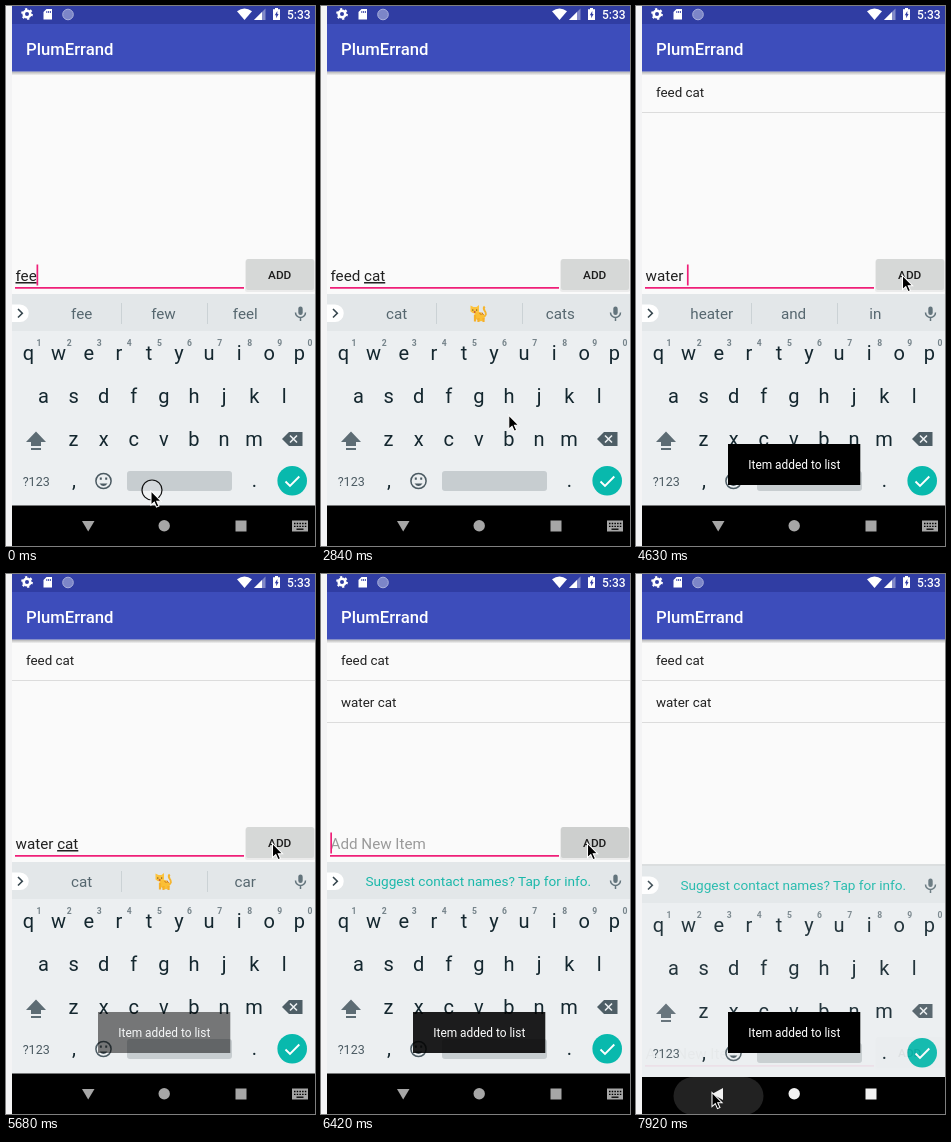
Recreate the animation shown at these times as an HTML page. Size 309x540 px, loop 8 s.

```html
<!DOCTYPE html>
<html lang="en">
<head>
<meta charset="utf-8">
<title>To-do list</title>
<style>
  html, body { margin: 0; width: 100%; height: 100%; overflow: hidden; background: #f4f4f5; }
  svg { display: block; width: 100%; height: 100%; }
  text { font-family: Roboto, sans-serif; white-space: pre; }
  .mid { text-anchor: middle; }
  .item { font-size: 13.4px; fill: #212121; }
  .edit { font-size: 15.2px; fill: #212121; }
  .bold { font-weight: 500; }
  .word { font-size: 15.2px; fill: #56676f; }
  .key { font-size: 20px; fill: #14272f; }
  .digit { font-size: 8.6px; font-weight: 700; fill: #75838a; }
</style>
</head>
<body>
<svg viewBox="0 0 309 540" xmlns="http://www.w3.org/2000/svg">
  <defs>
    <linearGradient id="fade" x2="0" y2="1">
      <stop offset="0" stop-color="#000" stop-opacity=".3"/>
      <stop offset="1" stop-color="#000" stop-opacity="0"/>
    </linearGradient>
    <clipPath id="screen"><path d="M6 0H309V540H6Z"/></clipPath>
  </defs>
  <g clip-path="url(#screen)">
    <path fill="#fafafa" d="M6 0H309V540H6Z"/>
    <path fill="url(#fade)" d="M6 65.500H309V69.500H6Z"/>
    <path fill="#3d4dbb" d="M6 18H309V65.500H6Z"/>
    <path fill="#303da3" d="M6 0H309V18H6Z"/>
    <text x="20" y="48.5" font-size="16.7" fill="#fff" class="bold">PlumErrand</text>

    <g id="status" fill="#fff">
      <circle cx="21" cy="8" r="3.3" fill="none" stroke="#fff" stroke-width="2.6"/>
      <circle cx="21" cy="8" r="5" fill="none" stroke="#fff" stroke-width="1.8" stroke-dasharray="2.2 3.036"/>
      <path d="M40.5 3H46V13.5H37.5V6Z"/>
      <path d="M40.8 5V7M42.6 5V7M44.4 5V7" stroke="#303da3" stroke-width=".9"/>
      <circle cx="62" cy="8.5" r="5.3" fill="#7c86c8" stroke="#a9b0dc"/>
      <path d="M231 5.2Q238.500 -.4 246 5.200L238.500 14Z"/>
      <path d="M259.500 2.500V14H248Z" opacity=".4"/>
      <path d="M256 6V14H248Z"/>
      <path d="M269 2H272V3.300H274V14H267V3.300H269Z"/>
      <path d="M271.300 5L268.800 9.300H270.200V12.300L272.600 8H271.300Z" fill="#303da3"/>
      <text x="281" y="13" font-size="12" class="bold">5:33</text>
    </g>

    <g id="row1">
      <text x="20" y="91" class="item">feed cat</text>
      <path d="M6 106.500H309" stroke="#dcdcdc"/>
    </g>
    <g id="row2">
      <text x="20" y="132.500" class="item">water cat</text>
      <path d="M6 148.500H309" stroke="#dcdcdc"/>
    </g>

    <g id="form">
      <text id="hint" x="9.500" y="275" class="edit" style="fill:#9a9a9a">Add New Item</text>
      <text id="typed" x="9.500" y="275" class="edit"><tspan id="done"></tspan><tspan id="live" text-decoration="underline"></tspan></text>
      <path d="M9 281.800H238" stroke="#ef1f78" stroke-width="1.700"/>
      <rect id="caret" y="258.500" width="1.700" height="21" fill="#ef1f78"/>
      <rect id="shade" x="239" y="254" width="70" height="32" rx="2" fill="#000"/>
      <rect id="button" x="240" y="253" width="68" height="31" rx="2"/>
      <text x="273.700" y="272.700" font-size="11.800" fill="#1d1d1d" class="bold mid">ADD</text>
    </g>

    <g id="board">
      <path fill="#eceff1" d="M6 288H309V504H6Z"/>
      <path fill="#e3e7e9" d="M6 288H309V325H6Z"/>
      <path id="edge" fill="#d9dcde" d="M6 286H309V288H6Z"/>
      <path fill="#fff" d="M6 298.500H14A8.700 8.700 0 0 1 14 316H6Z"/>
      <path d="M12 303L16.300 307.200L12 311.500" fill="none" stroke="#37474f" stroke-width="1.600"/>
      <g id="words">
        <path d="M115.500 297V318M201.500 297V318" stroke="#cbd2d5"/>
        <text x="75.700" y="313" class="word mid"></text>
        <text x="157.500" y="313" class="word mid"></text>
        <text x="239.300" y="313" class="word mid"></text>
        <g id="cat">
          <path d="M162 311Q167 309 163.500 304.500Q162 302 163.700 300.500" fill="none" stroke="#f5b52e" stroke-width="2"/>
          <ellipse cx="158.500" cy="310.500" rx="5.600" ry="4.200" transform="rotate(35 158.500 310.500)" fill="#fbbf35"/>
          <path d="M154 309V315.500M157.500 312V316M162.500 312V316" stroke="#f5b02b" stroke-width="2.200"/>
          <path d="M149.500 299.500L152.500 301H155.500L158 299V305.500Q154 309.500 149.500 305.500Z" fill="#fcc33d"/>
          <path d="M158.500 307L160.500 309M161 306.500L162.500 309" stroke="#c8741d"/>
          <path d="M151.800 303.500V304.600M155.700 303.500V304.600" stroke="#3e2a1a"/>
          <circle cx="153.700" cy="306" r="1" fill="#c65a3a"/>
        </g>
      </g>
      <text id="tip" x="157.300" y="312" font-size="13.600" fill="#1bb8aa" class="mid">Suggest contact names? Tap for info.</text>
      <g id="mic" fill="none" stroke="#63747c" stroke-width="1.500">
        <rect x="292.300" y="300.500" width="4.400" height="8.400" rx="2.200" fill="#63747c" stroke="none"/>
        <path d="M289.500 306.500A5 5 0 0 0 299.500 306.500M294.500 311.500V315"/>
      </g>
      <g id="keys"></g>
      <path fill="#5d6c74" d="M30 425.500L40 436H35V440H25V436H20ZM25 442H35V444H25Z"/>
      <path fill="#4e5e66" d="M283 426H296.500V440H283L276 433Z"/>
      <path d="M284 429.500L291 436.500M291 429.500L284 436.500" stroke="#eceff1" stroke-width="1.600"/>
      <text x="30.200" y="479.500" font-size="12.500" fill="#4b5a62" class="mid">?123</text>
      <g fill="none" stroke="#4b5a62" stroke-width="1.500">
        <circle cx="97.500" cy="475" r="7.600"/>
        <path d="M93.500 477.500Q97.500 482.500 101.500 477.500Z" fill="#4b5a62" stroke="none"/>
        <path d="M94.800 471.500V473.700M100.200 471.500V473.700" stroke-width="2"/>
      </g>
      <rect x="121" y="465" width="105" height="20" rx="3" fill="#c7cdd0"/>
      <circle cx="286.200" cy="474.700" r="14.800" fill="#08b9ad"/>
      <path d="M279.500 475.500L284 480L293.300 470.500" fill="none" stroke="#fff" stroke-width="1.900"/>
    </g>

    <g id="nav">
      <rect id="navBar" x="6" width="303" height="42" fill="#000"/>
      <rect id="press" x="37.500" y="503" width="90" height="38" rx="20" fill="#222"/>
      <path id="back"/>
      <circle cx="158.200" cy="519.700" r="5.700"/>
      <path d="M229.500 514.500H240.500V525.500H229.500Z"/>
      <g id="switcher">
        <path d="M286 514.500H302V525.500H286Z"/>
        <path d="M288 517.500H300.500M288 520.300H300.500" stroke="#000" stroke-width="1.300" stroke-dasharray="1.500 1.200"/>
        <path d="M290.500 523.200H297.500" stroke="#000" stroke-width="1.300"/>
      </g>
    </g>

    <g id="toast">
      <path d="M92 438H224.300V479H92Z"/>
      <text x="158.300" y="462.700" font-size="11.900" fill="#fff" class="mid">Item added to list</text>
    </g>
  </g>
  <g id="mouse">
    <circle id="ring" cx="1" cy="-1" r="10" fill="#fff" fill-opacity=".25" stroke="#111" stroke-width="1.200"/>
    <path transform="scale(1.17)" d="M0 0V12L2.800 9.500L4.700 13.800L6.800 12.900L4.900 8.700H8.600Z" fill="#000" stroke="#fff" stroke-width=".9"/>
  </g>
</svg>
<script>
const $ = id => document.getElementById(id);
const LOOP = 8000, STEP = 150, HIDE_AT = 7920;

// start time, finished text, word being typed, suggestions ('*' is the cat)
const edits = [
  [0, '', 'fee', 'fee few feel'],
  [150, '', 'feed', 'feed feeds feedback'],
  [600, 'feed ', '', 'the me my'],
  [750, 'feed ', 'c', 'c can cat'],
  [900, 'feed ', 'ca', 'ca can cat'],
  [1040, 'feed ', 'cat', 'cat * cats'],
  [3590, '', '', ''],
  [3740, '', 'w', 'w we what'],
  [3890, '', 'wa', 'wa was want'],
  [4040, '', 'wat', 'wat water watch'],
  [4190, '', 'wate', 'wate water waters'],
  [4340, '', 'water', 'water waters eater'],
  [4630, 'water ', '', 'heater and in'],
  [4780, 'water ', 'ca', 'ca can cat'],
  [4930, 'water ', 'cat', 'cat * car'],
  [6270, '', '', '']
];
const toasts = [[0, 0], [3590, .35], [3740, 1], [5680, .5], [5830, 0], [6270, .35], [6420, .88], [6570, 1]];
const buttons = [[0, '#d6d8d7'], [3440, '#c8caca'], [3590, '#bfc1c0'], [3740, '#cdcfce'], [3890, '#d6d8d7'],
  [5980, '#d2d4d3'], [6130, '#c4c6c5'], [6270, '#bfc1c0'], [6420, '#cdcfce'], [6570, '#d6d8d7']];
const caretOff = [[1490, 2090], [2540, 3140], [5380, 5830], [6720, 7320], [7770, LOOP]];
const clicks = [[0, 150], [3440, 3590], [5980, 6270], [7770, HIDE_AT]];
const spots = [[145, 485], [266.5, 269.5], [76, 518.5]];

const at = (list, t) => list.filter(row => row[0] <= t).pop();
const within = (spans, t) => spans.some(([a, b]) => t >= a && t < b);
const show = (id, on) => $(id).setAttribute('visibility', on ? 'inherit' : 'hidden');
const set = (id, name, value) => $(id).setAttribute(name, value);
const clamp = v => Math.max(0, Math.min(1, v));

function label(x, y, kind, text) {
  const el = document.createElementNS('http://www.w3.org/2000/svg', 'text');
  el.setAttribute('x', x);
  el.setAttribute('y', y);
  el.setAttribute('class', kind + ' mid');
  el.textContent = text;
  $('keys').append(el);
}

[['qwertyuiop', 22.5, 354], ['asdfghjkl', 37.5, 396.5], ['zxcvbnm', 67.5, 439.5]].forEach(([row, x, y], r) =>
  [...row].forEach((key, i) => {
    label(x + 30.1 * i, y, 'key', key);
    if (!r) label(x + 30.1 * i + 10.5, 340, 'digit', (i + 1) % 10);
  }));
label(68, 481, 'key', ',');
label(248.5, 481, 'key', '.');

function pointer(t) {
  const ticks = start => Math.floor((t - start) / STEP);
  const first = t < 6720;
  const [from, to] = first ? spots : spots.slice(1);
  const k = clamp(first ? ticks(2540) / 5 : (ticks(6720) + 1) / 7);
  const e = first ? k * k * (3 - 2 * k) : 1 - (1 - k) ** 1.6;
  return from.map((v, i) => v + (to[i] - v) * e);
}

const wordSlots = [...document.querySelectorAll('#words text')];
let current;

function type(edit) {
  if (edit === current) return;
  current = edit;
  const [, done, live, list] = edit;
  $('done').textContent = done;
  $('live').textContent = live;
  const words = list.split(' ');
  wordSlots.forEach((slot, i) => slot.textContent = words[i] === '*' ? '' : words[i] || '');
  show('words', list);
  show('cat', words[1] === '*');
  show('tip', !list);
  show('hint', !done && !live);
  set('caret', 'x', 9.3 + (done + live ? $('typed').getComputedTextLength() : 0));
}

function draw(t) {
  const closing = t >= HIDE_AT;
  type(at(edits, t));
  show('row1', t >= 3590);
  show('row2', t >= 6270);
  show('caret', !within(caretOff, t));
  set('toast', 'opacity', at(toasts, t)[1]);
  set('button', 'fill', at(buttons, t)[1]);
  set('shade', 'opacity', within([[3440, 3740], [5980, 6420]], t) ? .14 : .06);

  set('form', 'transform', `translate(0 ${closing ? 210 : 0})`);
  set('board', 'transform', `translate(0 ${closing ? 4 : 0})`);
  set('board', 'opacity', closing ? .93 : 1);
  show('edge', closing);
  set('navBar', 'y', closing ? 503 : 499.5);
  show('press', closing);
  show('switcher', !closing);
  set('back', 'd', closing ? 'M87 514V526L76 520Z' : 'M76 515H88.500L82.200 525.500Z');
  set('nav', 'fill', closing ? '#f2f2f2' : '#a6a6a6');

  set('mouse', 'transform', `translate(${pointer(t)})`);
  show('ring', within(clicks, t));
}

function frame() {
  draw(performance.now() % LOOP);
  requestAnimationFrame(frame);
}
frame();
</script>
</body>
</html>
```
